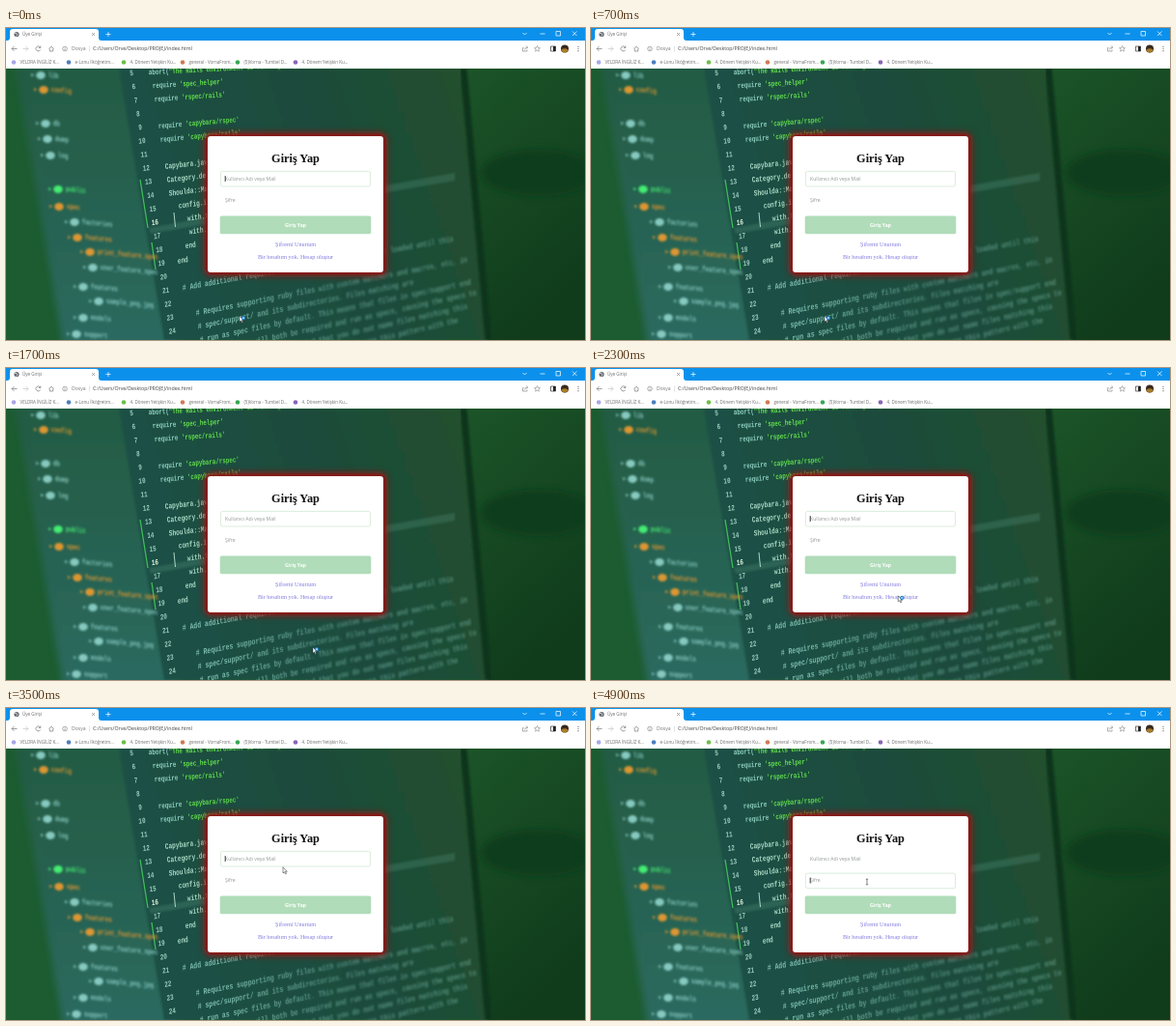
An HTML page for the animation above (5000 ms loop, 600x323 px).

```html
<!DOCTYPE html>
<html lang="tr">
<head>
<meta charset="utf-8">
<title>Üye Girişi</title>
<style>
  html, body { margin: 0; width: 100%; height: 100%; overflow: hidden; background: #1b5a2c; }
  svg { display: block; width: 100%; height: 100%; }
  .ui { font-family: "Open Sans", "Noto Sans", sans-serif; }
  .serif { font-family: "Liberation Serif", serif; }
  .code { font-family: "Liberation Mono", monospace; font-weight: bold; white-space: pre; }
</style>
</head>
<body>
<svg id="stage" viewBox="0 0 600 323" preserveAspectRatio="none">
  <defs>
    <linearGradient id="sidebar" x2="0" y2="1">
      <stop offset="0" stop-color="#235a42"/>
      <stop offset="1" stop-color="#2b6a60"/>
    </linearGradient>
    <linearGradient id="panel" x1=".1" x2=".9" y1=".2" y2="0">
      <stop offset="0" stop-color="#1e5044"/>
      <stop offset=".5" stop-color="#1e4c3c"/>
      <stop offset="1" stop-color="#214f2e"/>
    </linearGradient>
    <linearGradient id="wall" x2=".4" y2="1">
      <stop offset="0" stop-color="#1c5428"/>
      <stop offset="1" stop-color="#103c1c"/>
    </linearGradient>
    <linearGradient id="toLeft" gradientUnits="userSpaceOnUse" x1="220" x2="350">
      <stop offset="0" stop-color="#fff"/>
      <stop offset="1" stop-color="#000"/>
    </linearGradient>
    <linearGradient id="toRight" gradientUnits="userSpaceOnUse" x1="220" x2="350">
      <stop offset="0" stop-color="#000"/>
      <stop offset="1" stop-color="#999"/>
    </linearGradient>
    <mask id="near" maskUnits="userSpaceOnUse" x="0" y="0" width="600" height="323">
      <rect width="600" height="323" fill="url(#toLeft)"/>
    </mask>
    <mask id="far" maskUnits="userSpaceOnUse" x="0" y="0" width="600" height="323">
      <rect width="600" height="323" fill="url(#toRight)"/>
    </mask>
    <filter id="soft"><feGaussianBlur stdDeviation=".35"/></filter>
    <filter id="blur"><feGaussianBlur stdDeviation=".9"/></filter>
    <filter id="haze" x="-20%" y="-20%" width="140%" height="140%"><feGaussianBlur stdDeviation="3.5"/></filter>
    <clipPath id="page"><rect y="42" width="600" height="281"/></clipPath>
    <g id="code" class="code"></g>
  </defs>

  <g clip-path="url(#page)">
    <rect y="42" width="600" height="281" fill="#1c5c30"/>
    <path d="M8 30H180V335H60Z" fill="url(#sidebar)" filter="url(#haze)"/>
    <path d="M117 42H474L500 323H164Z" fill="url(#panel)" filter="url(#blur)"/>
    <path d="M474 42H600V323H500Z" fill="url(#wall)"/>
    <ellipse cx="552" cy="150" rx="60" ry="24" fill="#113e1b" filter="url(#haze)"/>
    <path d="M474 42L500 323" stroke="#10361d" stroke-width="7" filter="url(#blur)"/>
    <path d="M148 207L465 150V158L150 213Z" fill="#4d8a75" opacity=".35" filter="url(#blur)"/>
    <path d="M139 157L147 207M151 222L155 250" stroke="#3fbd5c" stroke-width="1.3" filter="url(#soft)"/>
    <path d="M174 191L175.5 206" stroke="#b9e6d3" stroke-width=".9"/>
    <g id="tree" class="code" filter="url(#blur)"></g>
    <g mask="url(#near)"><use href="#code" filter="url(#soft)"/></g>
    <g mask="url(#far)"><use href="#code" filter="url(#blur)"/></g>
  </g>

  <g id="chrome" class="ui">
    <rect width="600" height="42" fill="#fff"/>
    <rect width="600" height="13" fill="#0b91ec"/>
    <path d="M1 13Q4 13 4 10V4Q4 1 7 1H93Q96 1 96 4V10Q96 13 99 13Z" fill="#fff"/>
    <circle cx="11" cy="6.5" r="2.6" fill="#666b70"/>
    <path d="M9 5.5H11L12 7L10.5 8.5" stroke="#fff" stroke-width=".6" fill="none"/>
    <path d="M89 5L92 8M92 5L89 8" stroke="#777" stroke-width=".6"/>
    <path d="M103.500 6.500H108.500M106 4V9" stroke="#fff" stroke-width=".7"/>
    <path d="M535.500 5L537.500 7L539.500 5M553.500 6H558.500M570 3.500H574.500V8H570ZM587 3.500L591.500 8M591.500 3.500L587 8" stroke="#fff" stroke-width=".7" fill="none"/>
    <path d="M11.500 21.500H6M8.500 19L6 21.500L8.500 24M35.500 20A2.500 2.500 0 1 0 35.700 22.500M35.800 18.500V20.500H33.800M44.500 21.500L47 19.200L49.500 21.500M45.300 21.500V24H48.700V21.500" stroke="#74787c" stroke-width=".7" fill="none"/>
    <path d="M17.500 21.500H23M20.500 19L23 21.500L20.500 24" stroke="#c3c6c9" stroke-width=".7" fill="none"/>
    <circle cx="61" cy="21.500" r="2.300" stroke="#777" stroke-width=".6" fill="none"/>
    <path d="M61 21.200V23M61 20V20.500" stroke="#777" stroke-width=".6"/>
    <path d="M86.500 18.500V24.500" stroke="#c4c7ca" stroke-width=".5"/>
    <path d="M536.500 20.500H535.500V24H540V22.500M537.500 22.500Q537.500 20 540.500 20M539.200 18.500L540.700 20L539.200 21.500" stroke="#777" stroke-width=".6" fill="none"/>
    <path d="M550.500 18.500L551.400 20.500L553.500 20.700L551.900 22.100L552.400 24.200L550.500 23.100L548.600 24.200L549.100 22.100L547.500 20.700L549.600 20.500Z" stroke="#777" stroke-width=".55" fill="none"/>
    <path d="M564.500 19H569.500V24H564.500Z" stroke="#333" stroke-width=".7" fill="none"/>
    <path d="M567 19H569.500V24H567Z" fill="#222"/>
    <circle cx="579" cy="21.500" r="4" fill="#37291f"/>
    <path d="M575.200 22.700Q579 20 582.800 22.700Q581.500 25.500 579 25.500Q576.500 25.500 575.200 22.700" fill="#a97c28"/>
    <g fill="#55595e"><circle cx="593" cy="19.300" r=".6"/><circle cx="593" cy="21.500" r=".6"/><circle cx="593" cy="23.700" r=".6"/></g>
  </g>

  <rect x="206" y="109" width="188" height="147" rx="6" fill="#a01218" filter="url(#haze)"/>
  <rect x="207.500" y="110.500" width="185" height="144" rx="4" fill="#8e1218" filter="url(#blur)"/>
  <rect x="209" y="112" width="182" height="141" rx="3" fill="#fff"/>
  <g text-anchor="middle">
    <text class="serif" x="300" y="138.800" font-size="12.300" font-weight="bold" fill="#111">Giriş Yap</text>
    <rect id="button" x="221.700" y="194.600" width="156.600" height="18.700" rx="2"/>
    <text class="ui" x="300" y="206" font-size="5.100" font-weight="bold" fill="#fff">Giriş Yap</text>
    <g class="serif" font-size="6.200" fill="#817cdf">
      <text x="300" y="225.600">Şifremi Unuttum</text>
      <text x="300" y="239.200">Bir hesabım yok. Hesap oluştur</text>
    </g>
  </g>
  <g fill="#fff" stroke="#cbe4cd" stroke-width=".7">
    <rect id="userBox" x="222.400" y="148.400" width="155.200" height="15.600" rx="2"/>
    <rect id="passBox" x="222.400" y="171.100" width="155.200" height="15.600" rx="2"/>
  </g>
  <g class="ui" font-size="5.150" fill="#94979a">
    <text x="227" y="157.800">Kullanıcı Adı veya Mail</text>
    <text x="227" y="180.400">Şifre</text>
  </g>
  <path id="caret" d="M227.200 153V159" stroke="#111" stroke-width=".8"/>

  <g id="pointer">
    <path id="arrow" d="M0 0V6.200L1.500 5L2.500 7.200L3.500 6.700L2.500 4.600H4.400Z" fill="#fff" stroke="#222" stroke-width=".5"/>
    <circle id="busy" cx="4" cy="2.200" r="1.700" fill="#8fd0f2" stroke="#1674c4" stroke-width="1"/>
    <path id="beam" d="M-1.200 -2.800H1.200M0 -2.800V2.800M-1.200 2.800H1.200" stroke="#333" stroke-width=".6"/>
  </g>
</svg>
<script>
const $ = id => document.getElementById(id);
const LOOP = 5000, STEP = 100, BLINK = 530;

function add(parent, name, attrs, text = "") {
  const node = document.createElementNS("http://www.w3.org/2000/svg", name);
  for (const key in attrs) node.setAttribute(key, attrs[key]);
  node.textContent = text;
  parent.append(node);
  return node;
}

// Browser labels
const label = (x, y, size, fill, text) =>
  add($("chrome"), "text", { x, y, "font-size": size, fill }, text);
label(17, 8.3, 4.5, "#666", "Üye Girişi");
label(68, 23.3, 5.1, "#777", "Dosya");
label(90, 23.3, 5.25, "#444", "C:/Users/Orve/Desktop/PROJEJ/index.html");
[
  [8, "#a9a6e8", "VELDRA İNGİLİZ K…"],
  [65, "#4b7fc0", "e-Lonu İlköğretim…"],
  [122, "#6bbf45", "4. Dönem Yetişkin Ku…"],
  [183, "#d07a55", "general - VornaFrom…"],
  [240, "#35a853", "(5)Vorna - Tumbel D…"],
  [300, "#8a63b5", "4. Dönem Yetişkin Ku…"]
].forEach(([x, fill, text]) => {
  add($("chrome"), "circle", { cx: x, cy: 35.5, r: 2.3, fill });
  label(x + 6.5, 37, 4.5, "#6b6b6b", text);
});

// Photographed editor: a narrow plane of text whose tilt grows downwards
const tilted = (parent, x, y, size, fill, text, slope) =>
  add(parent, "text", {
    transform: `matrix(.73 ${slope * .73} .08 1 ${x} ${y})`, "font-size": size, fill
  }, text);

const rowY = n => 49.2 + (n - 5) * 14.1;
const gutterX = y => 130.5 + (y - 49) * .159;
const rowSlope = y => -.05 - .16 * (y - 49) / 275;

const TEXT = "#8fd0c2", STRING = "#62de4c", PALE = "#a9d8c4", NOTE = "#7dbdb0";
[
  [5, 148, 8, TEXT, "abort(", '"The Rails environment is running in production mode!")'],
  [6, 152, 8, TEXT, "require", " 'spec_helper'"],
  [7, 154, 8, TEXT, "require", " 'rspec/rails'"],
  [9, 158, 8, TEXT, "require", " 'capybara/rspec'"],
  [10, 160, 8, TEXT, "require", " 'capybara/rails'"],
  [12, 165, 8.4, PALE, "Capybara.javascript_driver = :webkit"],
  [13, 167, 8.4, PALE, "Category.delete_all; Category.create"],
  [14, 169, 8.4, PALE, "Shoulda::Matchers.configure do |config|"],
  [15, 179, 8.4, PALE, "config.integrate do |with|"],
  [16, 188, 8.4, PALE, "with.test_framework :rspec"],
  [17, 190, 8.4, PALE, "with.library :rails"],
  [18, 186, 8.4, PALE, "end"],
  [19, 178, 8.4, PALE, "end"],
  [21, 183, 8.8, NOTE, "# Add additional requires below this line. Rails is not loaded until this"],
  [23, 197, 8.8, NOTE, "# Requires supporting ruby files with custom matchers and macros, etc, in"],
  [24, 199, 8.8, NOTE, "# spec/support/ and its subdirectories. Files matching are"],
  [25, 201, 8.8, NOTE, "# run as spec files by default. This means that files in spec/support end"],
  [26, 203, 8.8, NOTE, "# in _spec.rb will both be required and run as specs, causing the specs to"],
  [27, 205, 8.8, NOTE, "# run twice. It is recommended that you do not name files matching this"],
  [28, 207, 8.8, NOTE, "# glob to end with _spec.rb. You can configure this pattern with the"]
].forEach(([n, x, size, fill, text, quoted]) => {
  const y = rowY(n), slope = rowSlope(y);
  const line = tilted($("code"), x, y + slope * (x - gutterX(y)), size, fill, text, slope);
  if (quoted) add(line, "tspan", { fill: STRING }, quoted);
});

for (let n = 5; n <= 24; n++) {
  const y = rowY(n), digits = String(n);
  tilted($("code"), gutterX(y) - digits.length * 2.1, y, 8.2,
    n === 16 ? "#e3f5df" : "#9ccdbf", digits, rowSlope(y));
}

const TEAL = "#86c9c0", ORANGE = "#dc9632", GREEN = "#45ed72";
[
  [33, 51, TEAL, "lib"],
  [36, 66, ORANGE, "config"],
  [38, 101, TEAL, "db"],
  [40, 117, TEAL, "dump"],
  [43, 134, TEAL, "log"],
  [51, 169, GREEN, "public"],
  [52, 187, ORANGE, "spec"],
  [68, 203, TEAL, "factories"],
  [71, 219, ORANGE, "features"],
  [84, 234, ORANGE, "print_feature_spec"],
  [87, 250, TEAL, "user_feature_spec"],
  [77, 270, TEAL, "features"],
  [93, 285, TEAL, "sample_png.jpg"],
  [77, 302, TEAL, "models"],
  [70, 319, TEAL, "support"]
].forEach(([x, y, fill, name]) => {
  add($("tree"), "path", { d: `M${x - 7} ${y - 4}l3 1.500l-2.500 2`, fill });
  add($("tree"), "ellipse", { cx: x + 3, cy: y - 2, rx: 4.8, ry: 4, fill });
  tilted($("tree"), x + 11, y, 8, fill, name, .09);
});

// Pointer path: time, x, y
const route = [
  [0, 242, 298], [1200, 242, 298], [1300, 244, 298], [1400, 244, 298],
  [1700, 318, 289], [2000, 325, 268], [2400, 316, 225], [2600, 308, 208],
  [2800, 306, 204], [3100, 302, 191], [3500, 287, 164.700], [3800, 285, 167],
  [4100, 286, 180], [LOOP, 286, 180]
];

function pointerAt(t) {
  const i = route.findIndex(p => p[0] > t);
  const [t0, x0, y0] = route[i - 1], [t1, x1, y1] = route[i];
  const k = (t - t0) / (t1 - t0);
  return [x0 + (x1 - x0) * k, y0 + (y1 - y0) * k];
}

const show = (id, on) => $(id).setAttribute("visibility", on ? "visible" : "hidden");
const within = (v, low, high) => v >= low && v <= high;

function render(t) {
  const [x, y] = pointerAt(t);
  const onPassword = t >= 4500;
  const inField = within(x, 222, 378) && (within(y, 148, 164) || within(y, 171, 187));
  const hover = within(x, 222, 378) && within(y, 195, 213);
  const phase = onPassword ? t - 4500 : t;
  const busy = t < 3100;

  $("pointer").setAttribute("transform", `translate(${x} ${y})`);
  show("beam", inField && !busy);
  show("arrow", !inField || busy);
  show("busy", busy);
  $("button").setAttribute("fill", hover ? "#2c842f" : "#b0dcb9");
  $("userBox").setAttribute("stroke-opacity", onPassword ? 0 : 1);
  $("passBox").setAttribute("stroke-opacity", onPassword ? 1 : 0);
  $("caret").setAttribute("transform", `translate(0 ${onPassword ? 22.5 : 0})`);
  show("caret", Math.floor(phase / BLINK) % 2 === 0);
}

const start = performance.now();
function tick(now) {
  const t = Math.max(0, now - start) % LOOP;
  render(Math.floor(t / STEP) * STEP);
  requestAnimationFrame(tick);
}
render(0);
requestAnimationFrame(tick);
</script>
</body>
</html>
```
